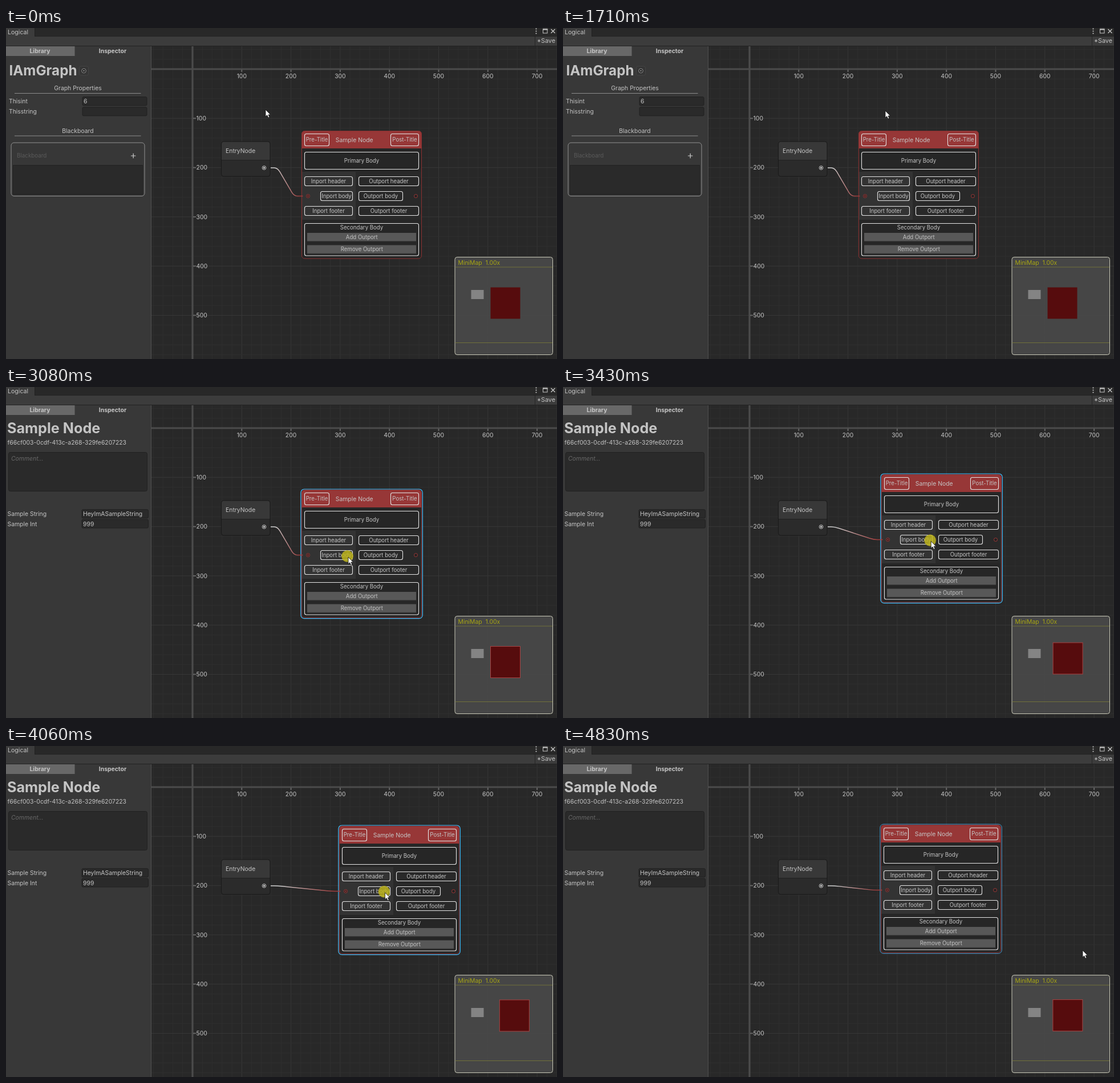
An HTML page that plays this animation: 966x580 px, repeating every 5.16 s.

```html
<!DOCTYPE html>
<html lang="en">
<head>
<meta charset="utf-8">
<title>Node graph editor</title>
<style>
html, body { margin: 0; width: 100%; height: 100%; overflow: hidden; background: #282828; }
svg { display: block; width: 966px; height: 580px; }
text { font-family: Inter, Roboto, sans-serif; font-size: 10.4px; fill: #c4c4c4; font-optical-sizing: none; white-space: pre; }
.mid { text-anchor: middle; }
.bold { font-weight: 700; }
.small { font-size: 9.65px; }
.field { fill: #2a2a2a; stroke: #202020; }
.box { fill: none; stroke: #e4e4e4; stroke-width: 1.1; }
.btn { fill: #585858; }
</style>
</head>
<body>
<svg id="stage" viewBox="0 0 966 580" xmlns="http://www.w3.org/2000/svg"></svg>
<script>
const LOOP = 5160;
const UNIT = 86.3;
const ORIGIN = { x: 327, y: 72 };
const stage = document.getElementById('stage');

function el(parent, tag, attrs = {}, content) {
  const node = document.createElementNS('http://www.w3.org/2000/svg', tag);
  for (const key in attrs) node.setAttribute(key, attrs[key]);
  if (content !== undefined) node.textContent = content;
  return parent.appendChild(node);
}
const group = (parent, attrs) => el(parent, 'g', attrs);
const rect = (parent, x1, y1, x2, y2, attrs) =>
  el(parent, 'rect', { x: x1, y: y1, width: x2 - x1, height: y2 - y1, ...attrs });
const line = (parent, x1, y1, x2, y2, stroke, width = 1) =>
  el(parent, 'line', { x1, y1, x2, y2, stroke, 'stroke-width': width });
const path = (parent, d, attrs) => el(parent, 'path', { d, fill: 'none', ...attrs });
const label = (parent, x, y, content, attrs) => el(parent, 'text', { x, y, ...attrs }, content);
const ring = (parent, cx, cy, r, stroke, dot) => {
  el(parent, 'circle', { cx, cy, r, fill: '#222', stroke });
  if (dot) el(parent, 'circle', { cx, cy, r: dot, fill: stroke });
};
const show = (node, on) => node.setAttribute('visibility', on ? 'visible' : 'hidden');

// Canvas with grid and rulers
function drawGrid() {
  const g = group(stage);
  rect(g, 254, 31, 966, 580, { fill: '#282828' });
  for (let k = -4; k <= 37; k++) {
    const x = ORIGIN.x + k * UNIT / 5;
    line(g, x, 32, x, 580, k % 5 ? '#2f2f2f' : '#373737');
  }
  for (let k = -2; k <= 29; k++) {
    const y = ORIGIN.y + k * UNIT / 5;
    line(g, 254, y, 966, y, k % 5 ? '#2f2f2f' : '#373737');
  }
  line(g, ORIGIN.x, 32, ORIGIN.x, 580, '#4b4b4b', 3.2);
  line(g, 254, ORIGIN.y, 966, ORIGIN.y, '#4b4b4b', 3.2);
  for (let n = 1; n <= 7; n++) {
    const x = ORIGIN.x + n * UNIT, y = ORIGIN.y + n * UNIT;
    line(g, x, 73, x, 77, '#666', 2);
    label(g, x, 88, n * 100, { class: 'mid' });
    if (n > 5) continue;
    line(g, 328, y, 333, y, '#666', 2);
    label(g, 333.6, y + 3.7, n * 100);
  }
}

function drawEntry() {
  const g = group(stage);
  rect(g, 377.5, 199, 463, 260, { rx: 4, fill: '#2b2b2b' });
  path(g, 'M377.5 231V203a4 4 0 0 1 4-4H459a4 4 0 0 1 4 4V231Z', { fill: '#383838' });
  line(g, 378, 231.5, 463, 231.5, '#212121');
  rect(g, 377.5, 199, 463, 260, { rx: 4, fill: 'none', stroke: '#191919' });
  label(g, 385, 218.5, 'EntryNode');
  ring(g, 452.5, 245, 3.3, '#d0d0d0', 1.7);
  const chevron = path(g, 'M449 214l3.3 3 3.3-3', { stroke: '#6a6a6a' });
  const outline = rect(g, 376.6, 198, 464.4, 261.4, { rx: 5, fill: 'none' });
  return { chevron, outline };
}

function drawSample() {
  const g = group(stage);
  const box = (x1, y1, x2, y2, content, textY = (y1 + y2) / 2 + 3.4) => {
    rect(g, x1 + .5, y1 + .5, x2 - .5, y2 - .5, { rx: 3, class: 'box' });
    label(g, (x1 + x2) / 2, textY, content, { class: 'mid small' });
  };
  rect(g, 518.5, 180.5, 728.5, 404, { rx: 5, fill: '#262626' });
  path(g, 'M518.5 211V185.5a5 5 0 0 1 5-5H723.5a5 5 0 0 1 5 5V211Z', { fill: '#973737' });
  rect(g, 519, 252, 613, 336, { fill: '#333' });
  rect(g, 613, 252, 728, 336, { fill: '#292929' });
  rect(g, 518.5, 180.5, 728.5, 404, { rx: 5, fill: 'none', stroke: '#8c3030' });
  box(523, 185, 567, 207, 'Pre-Title');
  label(g, 610.7, 199.7, 'Sample Node', { class: 'mid' });
  box(674, 185, 724, 207, 'Post-Title');
  box(523, 217, 724, 248, 'Primary Body');
  box(523, 260, 608, 277, 'Inport header');
  box(618, 260, 724, 277, 'Outport header');
  box(551, 286, 608, 303, 'Inport body');
  box(618, 286, 696, 303, 'Outport body');
  box(523, 312, 608, 329, 'Inport footer');
  box(618, 312, 724, 329, 'Outport footer');
  box(523, 342, 724, 399.5, 'Secondary Body', 352.7);
  [[359, 'Add Outport'], [380.5, 'Remove Outport']].forEach(([y, content]) => {
    rect(g, 528, y, 719, y + 14.7, { class: 'btn' });
    line(g, 528, y + 14.7, 719, y + 14.7, '#3a3a3a');
    label(g, 623.8, y + 10.7, content, { class: 'mid small' });
  });
  ring(g, 529.5, 294.5, 3, '#a33838', 1.2);
  ring(g, 718.5, 294.5, 3, '#a33838');
  const outline = rect(g, 516.9, 179, 730.3, 405.6, { rx: 6, fill: 'none' });
  return { g, outline };
}

function drawMinimap() {
  const g = group(stage);
  rect(g, 787, 401.5, 958.5, 572.5, { rx: 4, fill: '#494949', 'fill-opacity': .93, stroke: '#c9c9b8' });
  line(g, 787.5, 419, 958, 419, '#71713a');
  line(g, 787.5, 551.5, 958, 551.5, '#71713a');
  label(g, 792.5, 414.5, 'MiniMap  1.00x', { style: 'fill:#a8a712' });
  const entry = rect(g, 815.5, 459, 837.5, 475, { fill: '#848484' });
  const sample = rect(g, 849.5, 454.5, 901.5, 509.5, { fill: '#560c0d' });
  return { entry, sample };
}

function drawWindow() {
  const g = group(stage);
  rect(g, 0, 0, 966, 15, { fill: '#282828' });
  rect(g, 0, 0, 50, 15, { fill: '#3c3c3c' });
  line(g, 50.5, 0, 50.5, 14, '#202020');
  rect(g, 0, 14.5, 966, 31, { fill: '#3c3c3c' });
  line(g, 50, 14.5, 966, 14.5, '#222');
  line(g, 0, 31.5, 966, 31.5, '#222');
  line(g, 927.5, 15, 927.5, 31, '#262626');
  label(g, 3, 11, 'Logical', { style: 'font-size:10.6px' });
  label(g, 931, 26, '*Save', { style: 'font-size:10.8px' });
  [1.5, 5.5, 9.5].forEach(cy => el(g, 'circle', { cx: 929.5, cy, r: 1.1, fill: '#c4c4c4' }));
  rect(g, 941.5, 2, 949, 9, { fill: 'none', stroke: '#c4c4c4' });
  line(g, 941, 2.5, 949.5, 2.5, '#c4c4c4', 2);
  path(g, 'M955.5 2l7 7m0-7l-7 7', { stroke: '#c4c4c4', 'stroke-width': 1.4 });
  rect(g, 0, 32, 254, 580, { fill: '#383838' });
  line(g, 254.5, 32, 254.5, 580, '#505050');
  rect(g, 0, 32, 120.5, 49, { fill: '#686868' });
  label(g, 59.5, 44.3, 'Library', { class: 'mid bold' });
  label(g, 187, 44.3, 'Inspector', { class: 'mid bold' });
}

function fieldRow(g, x, y, name, value, left, right) {
  label(g, x, y, name);
  rect(g, left + .5, y - 11.5, right - .5, y + 3.5, { rx: 2, class: 'field' });
  label(g, left + 2.5, y, value);
}

function drawGraphPanel() {
  const g = group(stage);
  const section = (y, content) => {
    label(g, 126, y, content, { class: 'mid' });
    line(g, 15, y + 5.5, 236.5, y + 5.5, '#8c8c8c');
  };
  label(g, 5.5, 83, 'IAmGraph', { class: 'bold', style: 'font-size:24.2px' });
  rect(g, 128.5, 67, 144.5, 83, { rx: 3, fill: '#353535', stroke: '#444' });
  ring(g, 136.5, 75, 3.8, '#909090', 1.3);
  section(109, 'Graph Properties');
  fieldRow(g, 5, 132.3, 'Thisint', '6', 133.5, 247.5);
  fieldRow(g, 5, 150.3, 'Thisstring', '', 133.5, 247.5);
  section(183.5, 'Blackboard');
  rect(g, 9, 201, 243, 294.5, { rx: 5, fill: '#373737', stroke: '#929292' });
  rect(g, 12.5, 240.5, 239.5, 291.5, { fill: '#2a2a2a', stroke: '#222' });
  label(g, 19, 226.7, 'Blackboard', { style: 'font-size:9.8px;fill:#5a5a5a' });
  path(g, 'M219 224h8.4m-4.2-4.2v8.4', { stroke: '#d0d0d0', 'stroke-width': 1.2 });
  return g;
}

function drawNodePanel(title, id) {
  const g = group(stage);
  label(g, 2, 81, title, { class: 'bold', style: 'font-size:25.2px' });
  label(g, 2.5, 100.5, id);
  rect(g, 4.5, 114.5, 247.5, 182.5, { rx: 3, class: 'field' });
  label(g, 9, 129, 'Comment...', { style: 'font-style:italic;fill:#686868' });
  return g;
}

function drawEdge() {
  const grad = el(el(stage, 'defs'), 'linearGradient', { id: 'wire', gradientUnits: 'userSpaceOnUse', x1: 464, y1: 0, y2: 0 });
  el(grad, 'stop', { offset: .15, 'stop-color': '#cfcfcf' });
  el(grad, 'stop', { offset: .9, 'stop-color': '#a03c3c' });
  const wire = path(stage, '', { stroke: 'url(#wire)', 'stroke-width': 1.5 });
  return (x, y) => {
    const a = { x: 476, y: 245 }, b = { x: x - 24.5, y };
    const len = Math.hypot(b.x - a.x, b.y - a.y);
    const ux = (b.x - a.x) / len * 8, uy = (b.y - a.y) / len * 8;
    grad.setAttribute('x2', x - 9);
    wire.setAttribute('d', `M464 245H${a.x - 6}Q${a.x} ${a.y} ${a.x + ux} ${a.y + uy}` +
      `L${b.x - ux} ${b.y - uy}Q${b.x} ${b.y} ${b.x + 6} ${b.y}H${x - 9}`);
  };
}

drawGrid();
const entry = drawEntry();
const sample = drawSample();
const setEdge = drawEdge();
const minimap = drawMinimap();
drawWindow();
const panels = {
  graph: drawGraphPanel(),
  entry: drawNodePanel('Entry Node', 'e73af006-ffa0-4471-91ca-aab8c48e9594'),
  sample: drawNodePanel('Sample Node', 'f66cf003-0cdf-413c-a268-329fe6207223')
};
fieldRow(panels.sample, 2.5, 226.3, 'Sample String', 'HeyImASampleString', 132.5, 250);
fieldRow(panels.sample, 2.5, 243.6, 'Sample Int', '999', 132.5, 250);
const press = el(stage, 'circle', { r: 10.3, fill: '#bdb41c', 'fill-opacity': .85 });
const pointer = path(stage, 'M0 0V12.2L2.8 9.7L4.8 14.2L6.9 13.3L5 8.9H8.7Z',
  { fill: '#fff', stroke: '#111', 'stroke-width': .8 });

const bursts = [[0, 0, 1], [70, 550, 7], [680, 680, 1], [880, 1370, 8], [1440, 1510, 2], [1710, 2190, 7],
  [2260, 2750, 8], [2880, 2880, 1], [3080, 3570, 8], [3640, 4130, 8], [4200, 4690, 8], [4760, 4830, 2]];
const ticks = bursts.flatMap(([from, to, n]) =>
  Array.from({ length: n }, (_, i) => n > 1 ? from + (to - from) * i / (n - 1) : from));

// Keys are [time, x, y]
const cursorKeys = [[0, 455, 143], [70, 448, 160], [230, 408, 240], [310, 406, 245], [390, 440, 246], [470, 492, 252],
  [550, 598, 256], [680, 408, 247], [880, 407, 246], [1090, 405, 244], [1160, 412, 252], [1300, 443, 281],
  [1370, 443, 281], [1440, 505, 205], [1510, 594, 123], [1710, 565, 145], [1870, 412, 238], [1950, 406, 245],
  [2190, 430, 248], [2330, 500, 252], [2540, 598, 295], [2750, 600, 298], [4410, 639, 256], [4480, 655, 280],
  [4690, 812, 379], [4760, 870, 370], [4830, 911, 358]];
const dragKeys = [[3080, 0, 0], [3220, 8, -6], [3360, 27, -20], [3430, 40, -27], [3500, 47, -68], [3570, 52, -87],
  [3640, 54, -84], [3780, 54, -54], [3920, 66, -14], [3990, 70, -28], [4060, 66, -40], [4130, 42, -30],
  [4200, 33, -34], [4340, 39, -42]];
const pressed = [[230, 310], [470, 550], [880, 1020], [1230, 1370], [1950, 2030], [2540, 2680], [3080, 4410]];
const selection = [[0, 'graph'], [310, 'entry'], [470, 'graph'], [880, 'entry'], [1300, 'graph'], [1950, 'entry'], [2610, 'sample']];

function along(keys, t) {
  if (t <= keys[0][0]) return { x: keys[0][1], y: keys[0][2] };
  const i = keys.findIndex(k => k[0] > t);
  const last = keys[keys.length - 1];
  if (i < 0) return { x: last[1], y: last[2] };
  const a = keys[i - 1], b = keys[i], f = (t - a[0]) / (b[0] - a[0]);
  return { x: a[1] + (b[1] - a[1]) * f, y: a[2] + (b[2] - a[2]) * f };
}

function cursorAt(t) {
  if (t < 3080 || t >= 4410) return along(cursorKeys, t);
  const now = along(dragKeys, t), before = along(dragKeys, t - 70);
  return { x: 600 + now.x + (now.x - before.x) * .4, y: 298 + now.y + (now.y - before.y) * .1 };
}

const inside = (p, x1, y1, x2, y2) => p.x >= x1 && p.x <= x2 && p.y >= y1 && p.y <= y2;

function setOutline(node, selected, hovered, thick) {
  show(node, selected || hovered);
  node.setAttribute('stroke', selected ? (hovered ? '#44c0ff' : '#4199d0') : '#2f6f94');
  node.setAttribute('stroke-width', selected && hovered ? thick : 1);
}

function render(time) {
  const t = ticks.filter(tick => tick <= time + .01).pop();
  const cursor = cursorAt(t);
  const off = along(dragKeys, t);
  const chosen = selection.filter(s => s[0] <= t + .01).pop()[1];
  const overEntry = inside(cursor, 377, 199, 463, 260);
  const overSample = t >= 2880 && inside(cursor, 518 + off.x, 180 + off.y, 729 + off.x, 404 + off.y);

  for (const name in panels) show(panels[name], name === chosen);
  show(entry.chevron, overEntry);
  setOutline(entry.outline, chosen === 'entry', overEntry, 1.8);
  setOutline(sample.outline, chosen === 'sample', overSample, 1.2);
  sample.g.setAttribute('transform', `translate(${off.x} ${off.y})`);
  setEdge(529.5 + off.x, 294.5 + off.y);
  minimap.sample.setAttribute('transform', `translate(${off.x * .24} ${off.y * .24})`);
  minimap.entry.setAttribute('stroke', chosen === 'entry' ? '#b4b4b4' : 'none');
  minimap.sample.setAttribute('stroke', chosen === 'sample' ? '#a84444' : 'none');
  pointer.setAttribute('transform', `translate(${cursor.x} ${cursor.y})`);
  press.setAttribute('cx', cursor.x - 1.5);
  press.setAttribute('cy', cursor.y - 1.5);
  show(press, pressed.some(([from, to]) => t >= from && t < to));
}

const start = performance.now();
function loop() {
  render((performance.now() - start) % LOOP);
  requestAnimationFrame(loop);
}
loop();
</script>
</body>
</html>
```
